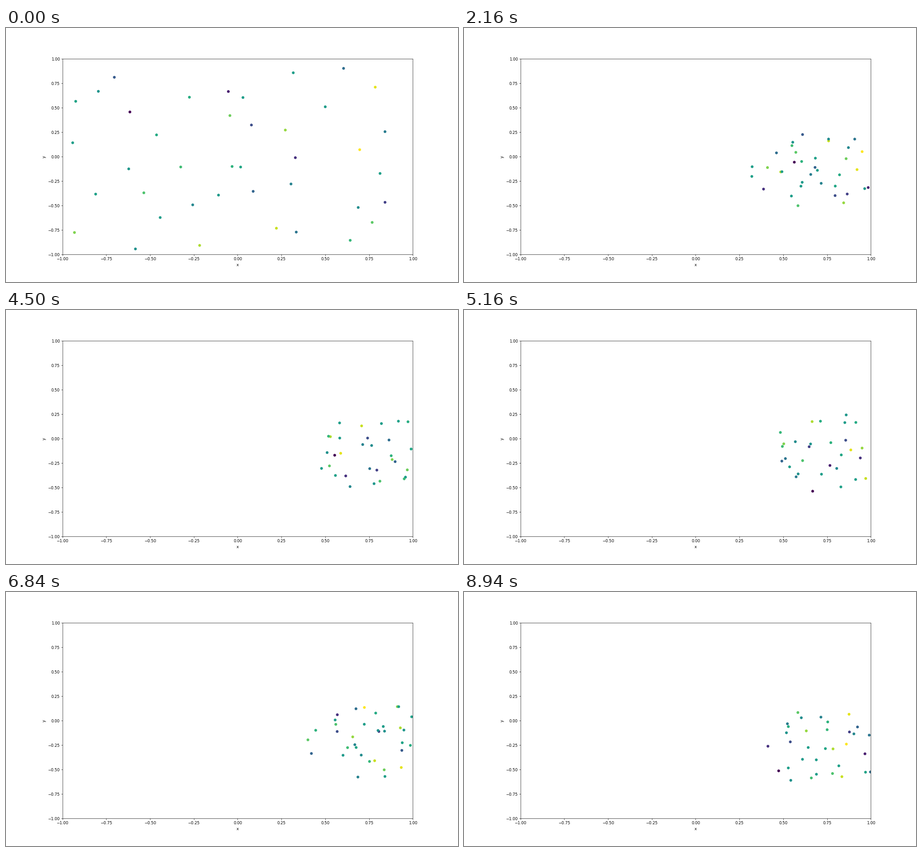
A matplotlib script that plays this animation: 998 by 561 pixels, repeating every 9000 ms.

```python
import numpy as np
import matplotlib.pyplot as plt
from matplotlib.animation import FuncAnimation

W, H, DPI = 998, 561, 62.375
FRAMES, STEP_MS = 150, 60
COLS, ROWS = 8, 5
COUNT = COLS * ROWS
RADIUS = .39            # settled swarm, data units
GATHER_STEPS = 28
SPIN, SWAY = .02, .13   # turn per step, wander as a share of the radius

# step, x, y of the swarm's centre
PATH = np.array([
    (0, 0, 0), (20, .44, -.06), (33, .67, -.11), (54, .88, -.16),
    (75, .80, -.15), (98, .80, -.13), (130, .76, -.24), (149, .78, -.28),
])

rng = np.random.default_rng(11)


def scatter_evenly():
    """Random points over the square, one in each cell of a loose grid."""
    col, row = np.meshgrid(np.arange(COLS), np.arange(ROWS))
    cells = np.column_stack([col.ravel(), row.ravel()])
    spots = cells + rng.uniform(.04, .96, (COUNT, 2))
    return (2 * spots / [COLS, ROWS] - 1) * .97


def square_to_disc(p):
    x, y = p.T
    return np.column_stack([x * np.sqrt(1 - y * y / 2),
                            y * np.sqrt(1 - x * x / 2)])


def centre(t):
    """Smooth curve through the path's key points."""
    keys, pts = PATH[:, 0], PATH[:, 1:]
    slopes = np.gradient(pts, keys, axis=0)
    i = min(np.searchsorted(keys, t, side="right") - 1, len(keys) - 2)
    h = keys[i + 1] - keys[i]
    u = (t - keys[i]) / h
    return ((1 + 2 * u) * (1 - u) ** 2 * pts[i]
            + u * (1 - u) ** 2 * h * slopes[i]
            + u * u * (3 - 2 * u) * pts[i + 1]
            + u * u * (u - 1) * h * slopes[i + 1])


start = scatter_evenly()
disc = square_to_disc(start)
freq = rng.uniform(.06, .13, (COUNT, 2))
phase = rng.uniform(0, 2 * np.pi, (COUNT, 2))
tint_freq = rng.uniform(.03, .10, COUNT)
tint_phase = rng.uniform(0, 2 * np.pi, COUNT)


def positions(t):
    gather = 1 - (1 - min(t / GATHER_STEPS, 1)) ** 2
    c, s = np.cos(SPIN * t), np.sin(SPIN * t)
    inner = disc @ np.array([[c, s], [-s, c]])
    inner = inner + SWAY * np.sin(freq * t + phase)
    return centre(t) + start * (1 - gather) + RADIUS * inner * gather


def tints(t):
    """Every step spans the whole colour map, with most dots near its middle."""
    rank = np.argsort(np.argsort(np.sin(tint_freq * t + tint_phase)))
    q = 2 * rank / (COUNT - 1) - 1
    return (.5 + .5 * q * np.abs(q)) ** .85


fig, ax = plt.subplots(figsize=((W + 1e-6) / DPI, (H + 1e-6) / DPI), dpi=DPI)
fig.subplots_adjust(left=.125, right=.9, bottom=61 / H, top=493 / H)
dots = ax.scatter(*positions(0).T, c=tints(0), cmap="viridis", vmin=0, vmax=1)
ax.set(xlim=(-1, 1), ylim=(-1, 1), xlabel="x", ylabel="y")


def update(t):
    dots.set_offsets(positions(t))
    dots.set_array(tints(t))
    return (dots,)


anim = FuncAnimation(fig, update, frames=FRAMES, interval=STEP_MS,
                     repeat=True, repeat_delay=0, blit=False)
plt.show()
```
